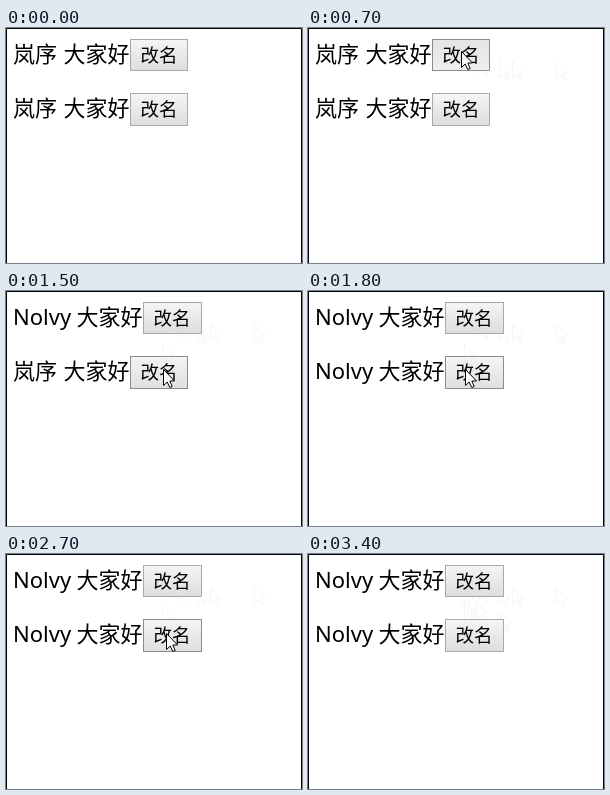
An HTML page that plays this animation: 296 px wide and 235 px high, repeating every 3.8 s.

```html
<!DOCTYPE html>
<html lang="zh-CN">
<head>
<meta charset="utf-8">
<title>改名</title>
<style>
  html, body { margin: 0; width: 100%; height: 100%; overflow: hidden; background: #fff; }
  svg { display: block; width: 296px; height: 235px; }
  text { font: 22px "Noto Sans", "Noto Sans CJK SC", "Noto Sans CJK", sans-serif; white-space: pre; }
  .label { font-size: 18.5px; text-anchor: middle; }
  .face { fill: url(#normal); stroke: #a9a9a9; }
  .hover .face { fill: url(#over); stroke: #8c8c8c; }
  .down .face { fill: url(#pressed); stroke: #8c8c8c; }
  #pointer { fill: #fff; stroke: #000; }
  #trail { fill: none; stroke: #f5f5f5; }
</style>
</head>
<body>
<svg viewBox="0 0 296 235">
  <defs>
    <linearGradient id="normal" x2="0" y2="1">
      <stop stop-color="#f5f5f5"/><stop offset="1" stop-color="#dddddd"/>
    </linearGradient>
    <linearGradient id="over" x2="0" y2="1">
      <stop stop-color="#f4f4f4"/><stop offset="1" stop-color="#dfdfdf"/>
    </linearGradient>
    <linearGradient id="pressed" x2="0" y2="1">
      <stop stop-color="#e4e4e4"/><stop offset="1" stop-color="#efefef"/>
    </linearGradient>
  </defs>
  <rect width="296" height="235" fill="#fff"/>
  <g id="trail"></g>
  <g id="rows"></g>
  <path id="pointer"/>
  <path d="M.5 235V.5H295.5V235" fill="none" stroke="#000"/>
</svg>
<script>
const LOOP = 3800;
const ARROW = "M.5 .5V16.5L4.2 13L6.8 18.5L9.2 17.5L6.8 12H11.5Z";

// time, x, y of the pointer tip; no position means it is off stage
const path = [
  [0], [200, 248, 33], [300, 204, 33], [400, 191, 33], [500, 171, 29], [600, 159, 25],
  [700, 153, 23], [1200, 156, 52], [1300, 159, 77], [1500, 157, 78],
  [2700, 160, 79], [2800, 159, 66], [2900, 156, 47], [3000, 154, 33],
  [3100, 168, 48], [3200, 192, 58], [3300, 260, 121], [3400]
];

const rows = [
  { top: 11, height: 32, renamed: 800, presses: [[700, 800]] },
  { top: 65, height: 33, renamed: 1800, presses: [[1700, 1800], [2300, 2500]] }
];

function add(parent, tag, attrs, text = "") {
  const el = document.createElementNS("http://www.w3.org/2000/svg", tag);
  for (const key in attrs) el.setAttribute(key, attrs[key]);
  el.textContent = text;
  parent.append(el);
  return el;
}

const $ = id => document.getElementById(id);
const pointer = $("pointer");
pointer.setAttribute("d", ARROW);

for (const row of rows) {
  const g = add($("rows"), "g", {});
  const y = row.top + 23;
  row.name = add(g, "text", { x: 7, y });
  row.greeting = add(g, "text", { y }, "大家好");
  row.button = add(g, "g", {});
  add(row.button, "rect", { class: "face", x: .5, y: .5, width: 57, height: row.height - 1 });
  add(row.button, "text", { class: "label", x: 29, y: 23 }, "改名");
}

const ghosts = path.slice(1, -2).map(([time, x, y]) => ({
  time, el: add($("trail"), "path", { d: ARROW, transform: `translate(${x} ${y})` })
}));

function drawRow(row, t, x, y) {
  const renamed = t >= row.renamed;
  const left = renamed ? 137 : 124;
  const right = left + (renamed ? 59 : 58);
  const hover = x >= left && x < right && y >= row.top && y < row.top + row.height;
  const down = row.presses.some(([from, to]) => t >= from && t < to);
  row.name.textContent = renamed ? "Nolvy" : "岚序";
  row.greeting.setAttribute("x", left - 66.4);
  row.button.setAttribute("transform", `translate(${left} ${row.top})`);
  row.button.firstChild.setAttribute("width", right - left - 1);
  row.button.setAttribute("class", down ? "down" : hover ? "hover" : "");
}

function draw(t) {
  const [start, x, y] = path.findLast(step => step[0] <= t);
  pointer.setAttribute("visibility", x === undefined ? "hidden" : "visible");
  if (x !== undefined) pointer.setAttribute("transform", `translate(${x} ${y})`);
  for (const { time, el } of ghosts) {
    el.setAttribute("visibility", time < start ? "visible" : "hidden");
  }
  for (const row of rows) drawRow(row, t, x, y);
}

const begin = performance.now();
function tick() {
  draw((performance.now() - begin) % LOOP);
  requestAnimationFrame(tick);
}
tick();
</script>
</body>
</html>
```
